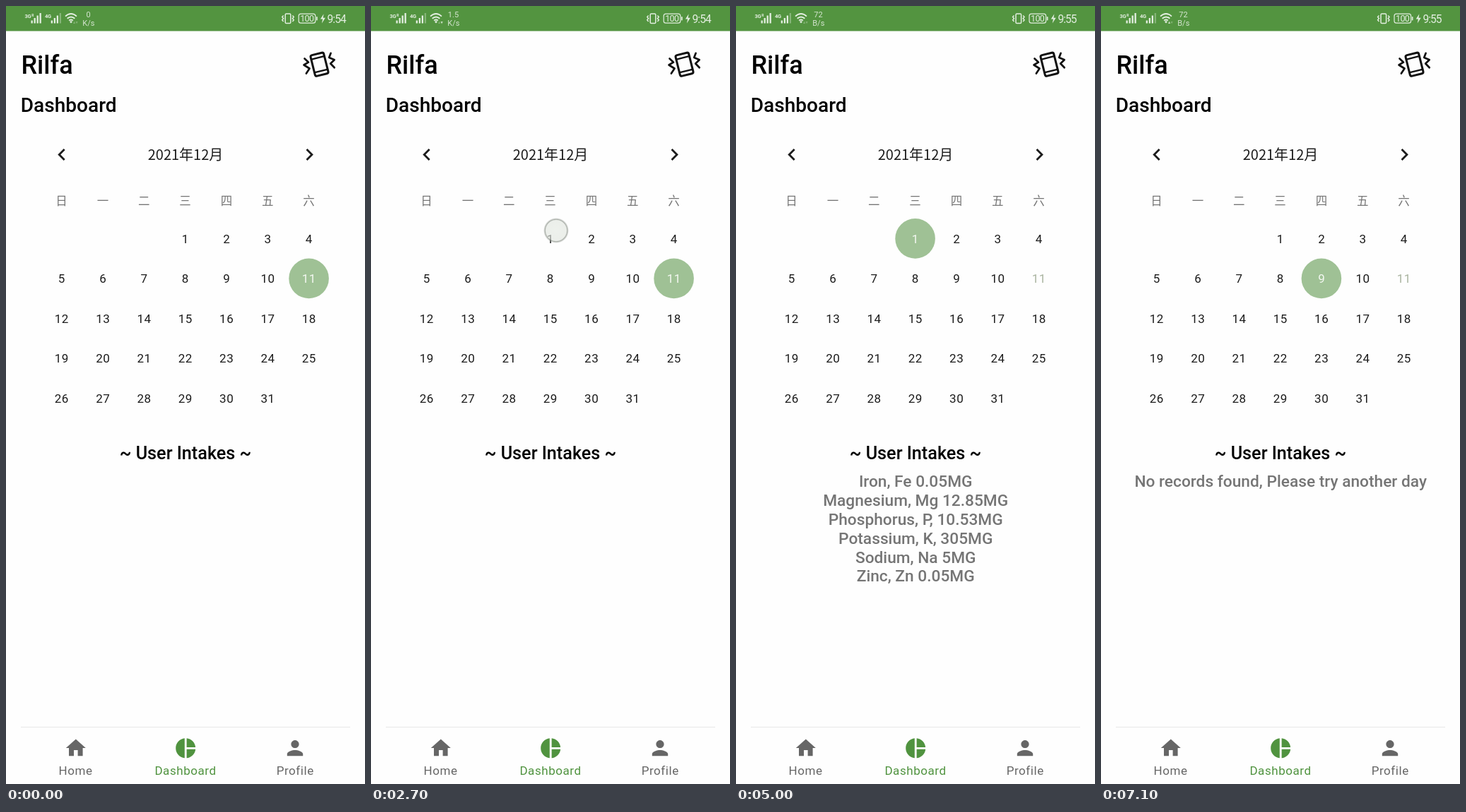
These frames come from a looping animation (508x1102 px, 8 s). An HTML page:

```html
<!DOCTYPE html>
<html lang="en">
<head>
<meta charset="utf-8">
<title>Intake dashboard</title>
<style>
html, body { margin: 0; width: 100%; height: 100%; overflow: hidden; background: #fefefe; }
svg { display: block; width: 100vw; height: 100vh; font-family: Roboto, sans-serif; }
.medium { font-weight: 500; }
.mid { text-anchor: middle; }
.cjk { font-family: "Noto Sans CJK SC", "Noto Sans CJK", "Noto Sans CJK JP", sans-serif; }
.day { font-size: 17px; letter-spacing: .5px; }
.nav { font-size: 17px; letter-spacing: .55px; }
</style>
</head>
<body>
<svg id="stage" viewBox="0 0 508 1102" preserveAspectRatio="none">
  <defs>
    <radialGradient id="glow">
      <stop offset="0" stop-color="#e6ebe4" stop-opacity=".68"/>
      <stop offset=".8" stop-color="#e0e5de" stop-opacity=".62"/>
      <stop offset=".87" stop-color="#8e958c" stop-opacity=".75"/>
      <stop offset="1" stop-color="#9a9f98" stop-opacity="0"/>
    </radialGradient>
  </defs>
  <rect width="508" height="1102" fill="#fefefe"/>

  <rect width="508" height="35.5" fill="#539440"/>
  <g fill="#e3eee0">
    <g font-size="7.5" font-weight="700" letter-spacing="-.3">
      <text x="26.5" y="16.5">3G</text>
      <text x="36.3" y="14.5" font-size="5">R</text>
      <text x="55" y="16.5">4G</text>
    </g>
    <g id="bars"></g>
    <g fill="none" stroke="#e3eee0" stroke-width="1.9">
      <path d="M84 14.6Q92 7.4 100 14.6M86.7 17.8Q92 13 97.3 17.8M89.2 20.6Q92 18.2 94.8 20.6"/>
    </g>
    <path d="M90 22.2Q92 20.4 94 22.2L92 24.6z"/>
    <path id="up" d="M95 25l1.6-3.4 1.6 3.4z"/>
    <path id="down" d="M98.5 22h3.2l-1.6 3.4z"/>
    <g class="mid" font-size="11" opacity=".9">
      <text id="rate" x="116.5" y="16"/>
      <text id="unit" x="116.8" y="28"/>
    </g>
    <g id="right">
      <g fill="none" stroke="#e3eee0" stroke-width="1.5">
        <rect x="395.2" y="11" width="7.6" height="13.6" rx="1.4"/>
        <path d="M392.6 13.5l-1.8 2.1 1.8 2.1-1.8 2.1 1.8 2.1M405.4 13.5l1.8 2.1-1.8 2.1 1.8 2.1-1.8 2.1"/>
        <rect x="414.2" y="11.2" width="23.6" height="13" rx="3" stroke-width="1.2"/>
      </g>
      <rect x="439" y="15" width="1.7" height="5.6" rx=".8"/>
      <text class="mid" x="425.8" y="22.2" font-size="12.5" letter-spacing="-.7">100</text>
      <path d="M449.6 11.2l-4.7 7.4h3.2l-1.2 6 5-7.9h-3.3z"/>
      <text id="clock" x="454.6" y="24" font-size="15.6" letter-spacing="-1"/>
    </g>
  </g>

  <g class="medium">
    <text x="21.6" y="95.7" font-size="36">Rilfa</text>
    <text x="20.8" y="150.3" font-size="28">Dashboard</text>
  </g>
  <g fill="none" stroke="#111" stroke-width="3" stroke-linejoin="round" stroke-linecap="round">
    <g transform="translate(443.5 82.7) rotate(-14)">
      <rect x="-9.6" y="-15.2" width="19.2" height="30.4" rx="2.5"/>
      <path d="M-9 -9.6H9M-9 9.6H9" stroke-width="2.4"/>
    </g>
    <path d="M422.5 74.5l5.5 5.2-6.5 3.8 8 5-4.6 7M459.6 66.8l-2.4 6.2 7.5 3.2-5.5 5.3 5.5 5.8" stroke-width="2.7"/>
  </g>

  <g fill="#1c1c1c">
    <path transform="translate(62.1 193.7) scale(1.4)" d="M15.41 7.41L14 6l-6 6 6 6 1.41-1.41L10.83 12z"/>
    <path transform="translate(412.5 193.7) scale(1.4)" d="M10 6L8.59 7.41 13.17 12l-4.58 4.59L10 18l6-6z"/>
    <text class="cjk medium mid" x="254" y="217.7" font-size="20">2021年12月</text>
  </g>
  <g id="week" class="cjk mid" font-size="16.5" fill="#757575"></g>
  <circle id="pick" r="28.3" fill="#9fc195"/>
  <g id="days" class="mid"></g>
  <circle id="touch" r="18" fill="url(#glow)"/>

  <text class="medium mid" x="254" y="642" font-size="25.2">~ User Intakes ~</text>
  <g id="list" class="medium mid" font-size="22.7" fill="#757575"></g>

  <path d="M21 1021.5H487" stroke="#ececec" stroke-width="1.4"/>
  <g class="mid nav" fill="#666">
    <path transform="translate(82 1034.3) scale(1.4)" d="M10 20v-6h4v6h5v-8h3L12 3 2 12h3v8z"/>
    <text x="98.6" y="1088.5">Home</text>
    <g fill="#50933f">
      <path transform="translate(237.4 1034.5) scale(1.4)" d="M11 2v20c-5.07-.5-9-4.79-9-10s3.93-9.5 9-10zm2.03 0v8.99H22c-.47-4.74-4.24-8.52-8.97-8.99zm0 11.01V22c4.74-.47 8.5-4.25 8.97-8.99z"/>
      <text x="254" y="1088.5">Dashboard</text>
    </g>
    <path transform="translate(392.2 1034.3) scale(1.4)" d="M12 12c2.21 0 4-1.79 4-4s-1.79-4-4-4-4 1.79-4 4 1.79 4 4 4zm0 2c-2.67 0-8 1.34-8 4v2h16v-2c0-2.66-5.33-4-8-4z"/>
    <text x="409.2" y="1088.5">Profile</text>
  </g>
</svg>
<script>
const LOOP = 8000, TODAY = 11;
const $ = id => document.getElementById(id);

function add(parent, tag, attrs, text) {
  const el = document.createElementNS('http://www.w3.org/2000/svg', tag);
  for (const key in attrs) el.setAttribute(key, attrs[key]);
  if (text) el.textContent = text;
  return parent.appendChild(el);
}

// Latest value whose start time has passed.
function at(t, steps) {
  let value = steps[0][1];
  for (const [start, v] of steps) if (t >= start) value = v;
  return value;
}

const colX = c => 78.6 + 58.33 * c;
const rowY = r => 329.4 + 56.5 * r;
const cell = day => [colX((day + 2) % 7), rowY(Math.floor((day + 2) / 7))];

function addBars(x, faintLast) {
  [4, 7.5, 11, 14.5].forEach((h, i) =>
    add($('bars'), 'rect', {
      x: x + i * 4, y: 24.5 - h, width: 2.3, height: h,
      opacity: faintLast && i === 3 ? 0.35 : 1
    }));
}
addBars(35.5, false);
addBars(63.7, true);

[...'日一二三四五六'].forEach((name, c) =>
  add($('week'), 'text', { x: colX(c), y: 281.6 }, name));

const days = [];
for (let d = 1; d <= 31; d++) {
  const [x, y] = cell(d);
  days[d] = add($('days'), 'text', { class: 'day', x: x + 0.25, y: y + 6.2 }, String(d));
}

function addLines(lines) {
  const group = add($('list'), 'g', {});
  lines.forEach((line, i) => add(group, 'text', { x: 254.2, y: 681.2 + 26.85 * i }, line));
  return group;
}
const lists = {
  1: addLines(['Iron, Fe 0.05MG', 'Magnesium, Mg 12.85MG', 'Phosphorus, P, 10.53MG',
    'Potassium, K, 305MG', 'Sodium, Na 5MG', 'Zinc, Zn 0.05MG']),
  9: addLines(['No records found, Please try another day'])
};

const selected = [[0, 11], [2800, 1], [6800, 9]];
const speed = [[0, ['0', 'K/s']], [2000, ['1.5', 'K/s']], [5000, ['72', 'B/s']]];
const touchPos = [[0, [262, 318]], [6800, [315, 374]]];
const touchFade = [[0, 0], [2700, 1], [2800, 0.85], [2900, 0.4], [3000, 0],
  [6800, 1], [6900, 0.75], [7000, 0.35], [7100, 0]];

function draw(t) {
  const day = at(t, selected);
  const [px, py] = cell(day);
  $('pick').setAttribute('cx', px);
  $('pick').setAttribute('cy', py);
  for (let d = 1; d <= 31; d++) {
    days[d].setAttribute('fill', d === day ? '#f4f8f2' : d === TODAY ? '#a9b39f' : '#1c1c1c');
  }
  for (const key in lists) lists[key].setAttribute('display', +key === day ? 'inline' : 'none');

  const [tx, ty] = at(t, touchPos);
  $('touch').setAttribute('cx', tx);
  $('touch').setAttribute('cy', ty);
  $('touch').setAttribute('opacity', at(t, touchFade));

  const [rate, unit] = at(t, speed);
  $('rate').textContent = rate;
  $('unit').textContent = unit;
  $('up').setAttribute('opacity', at(t, [[0, 0.3], [6300, 0.8]]));
  $('down').setAttribute('opacity', at(t, [[0, 0.3], [300, 0.8], [3300, 0.3]]));

  const late = t >= 3600;
  $('clock').textContent = late ? '9:55' : '9:54';
  $('right').setAttribute('transform', `translate(${late ? 0.8 : 0} 0)`);
}

const begin = performance.now();
function tick() {
  draw((performance.now() - begin) % LOOP);
  requestAnimationFrame(tick);
}
tick();
</script>
</body>
</html>
```
